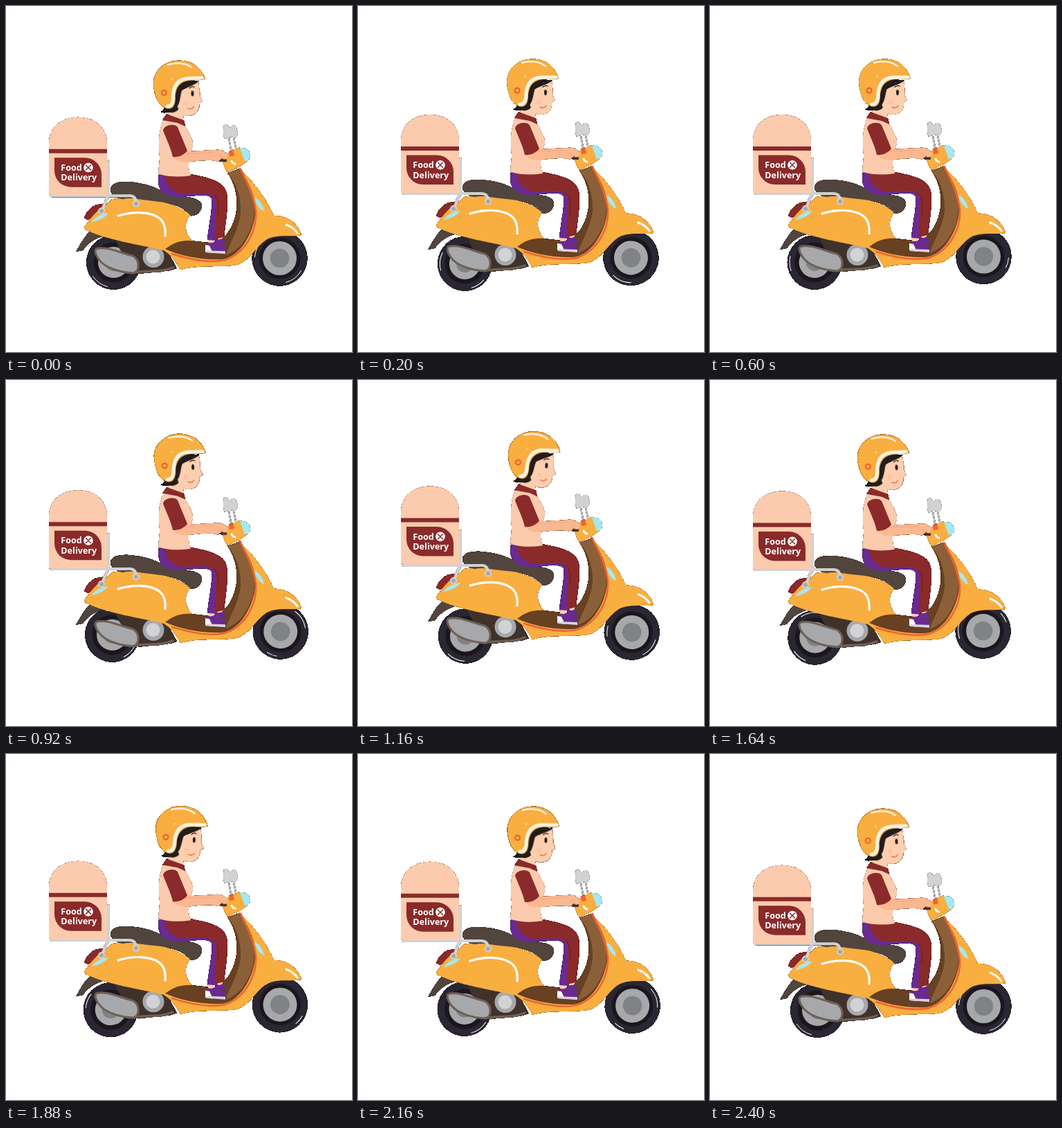
Animation of 500 by 500 pixels, one loop 2440 ms. Source, as an HTML page:

```html
<!DOCTYPE html>
<html lang="en">
<head>
<meta charset="utf-8">
<title>Food delivery scooter</title>
<style>
@property --a { syntax: "<angle>"; inherits: true; initial-value: 0deg; }
html, body { margin: 0; width: 100%; height: 100%; overflow: hidden; background: #fff; }
svg { display: block; width: 100vw; height: 100vh; animation: ride 2440ms steps(61) infinite; }
@keyframes ride { from { --a: 0deg; } to { --a: 1098deg; } }

/* --k is the height of the bounce */
.bob { transform: translateY(calc(cos(var(--a)) * var(--k) * 1px)); }
.head { transform: translateY(calc(cos(var(--a)) * 2.5px)) rotate(calc(cos(var(--a)) * -2.6deg)); transform-origin: 247px 158px; }
.wheel { transform: rotate(calc(var(--a) * 2 / 3)); }

.l { fill: none; stroke-linecap: round; stroke-linejoin: round; }
.yellow { fill: #f9ae40; }
.red { fill: #8a2b2c; }
.purple { fill: #692c91; }
.skin { fill: #fdcfae; }
.arm { fill: #fab890; }
.peach { fill: #fccbad; }
.dark { fill: #51443e; }
.engine { fill: #3f322b; }
.grey { fill: #a6a8ab; }
.hub { fill: #808285; }
.black { fill: #201a1b; }
.glass { fill: #a5e8f4; }
.tyre { fill: #2b2833; }
.well { fill: #1b191f; }
.white { stroke: #fff; }
text { font: 700 12.6px "Open Sans", "Noto Sans", sans-serif; fill: #fff; }
</style>
</head>
<body>
<svg viewBox="0 0 500 500">
  <!-- hard dark rim around the whole silhouette -->
  <filter id="rim" filterUnits="userSpaceOnUse" x="0" y="0" width="500" height="500">
    <feComponentTransfer in="SourceAlpha">
      <feFuncA type="discrete" tableValues="0 1 1 1 1"/>
    </feComponentTransfer>
    <feMerge>
      <feMergeNode/>
      <feMergeNode in="SourceGraphic"/>
    </feMerge>
  </filter>

  <g filter="url(#rim)">
  <!-- wheels turn slightly off centre -->
  <g transform="translate(153.3 370.5)">
    <g class="wheel">
      <g transform="translate(2.2 0)">
        <circle class="tyre" r="39.3"/>
        <circle class="well" r="29"/>
        <circle class="grey" r="22.5"/>
        <circle class="hub" r="12.5"/>
        <path class="l white" d="M-9 35A36 36 0 0 1-30 20M35 9A36 36 0 0 0 34-12"/>
      </g>
    </g>
  </g>
  <g transform="translate(395.5 363.3)">
    <g class="wheel">
      <g transform="translate(0 1.2)">
        <circle class="tyre" r="40"/>
        <circle class="well" r="30"/>
        <circle class="grey" r="24.5"/>
        <circle class="hub" r="13.8"/>
        <path class="l white" d="M31 18A36 36 0 0 1 9 35M-36-2A36 36 0 0 1-32-16"/>
      </g>
    </g>
  </g>

  <!-- engine and exhaust -->
  <g class="bob" style="--k:3">
    <path class="dark" d="M101 352C107 343 113 327 127 319L152 327C132 330 120 338 111 350Z"/>
    <path class="engine" d="M158 334L230 345L247 376L238 379L192 384C178 370 166 351 163 346Z"/>
    <path class="grey" stroke="#6e6056" stroke-width="3" d="M130 348C145 343 165 354 183 358C194 364 193 379 185 383C165 382 143 376 134 363C129 356 128 351 130 348Z"/>
    <path class="l" stroke="#6e6056" stroke-width="3.5" d="M186 382C203 379 222 383 241 375"/>
    <circle class="grey" cx="213" cy="359.5" r="15.5"/>
    <circle cx="212.5" cy="359.5" r="10" fill="#d1d3d4"/>
  </g>

  <!-- scooter body -->
  <g class="bob" style="--k:3.2">
    <g class="l" stroke="#bfc1c3" stroke-width="2">
      <path d="M322 187L325 204M329 187L332 202"/>
    </g>
    <path fill="#d0d2d3" d="M315 168C318 167 322 170 324 173C326 169 330 167 332 171C336 177 336 185 331 187L324 186L316 189C313 183 314 174 315 168Z"/>

    <path class="red" d="M113 303C117 291 128 282 142 283L127 302L118 306Z"/>
    <path class="yellow" d="M113 316C121 307 127 294 145 284L153 276C196 269 240 279 267 298C257 308 257 325 270 337L300 342L334 315L340 250L333 231C350 239 379 278 387 300C406 298 424 313 427 328C414 331 393 326 377 334C358 346 351 371 325 372C300 374 275 371 252 378C245 365 238 356 228 350C195 342 145 335 115 320Z"/>
    <path fill="#673f20" d="M230 348C243 338 254 335 268 336L303 340C338 320 342 268 320 238L337 232C357 258 364 285 359 305C353 335 333 362 310 363C280 364 250 357 230 348Z"/>
    <path fill="#8b6039" d="M320 238L336 233C358 260 363 290 356 312C347 338 335 350 318 357C322 341 337 320 339 295C340 273 332 250 320 238Z"/>
    <path class="l" stroke="#ee6432" stroke-width="2.6" d="M240 355C262 362 292 369 316 364C346 354 363 322 361 293C358 270 349 251 338 232"/>
    <path class="l white" stroke-width="3.2" d="M162 300C184 293 208 294 221 303C229 309 231 318 230 329"/>
    <path class="l white" stroke-width="3" d="M405 313Q416 317 421 325"/>
    <path class="glass" d="M123 309C129 302 137 297 148 296C143 303 132 308 123 309Z"/>
    <path class="glass" d="M359 273C366 276 372 285 373 293C365 290 361 282 359 273Z"/>
    <path class="dark" d="M151 264C150 252 164 249 187 252C216 255 231 270 253 272C271 273 284 277 283 286C282 295 276 300 267 300C256 286 238 281 216 279C193 277 181 273 169 276C160 275 154 271 151 264Z"/>

    <path class="yellow" d="M312 214L337 201L347 208L349 221L337 229L320 237C315 231 313 222 312 214Z"/>
    <path class="glass" d="M338 202C347 201 353 206 353 214C352 219 349 221 345 221Z"/>
    <path fill="#ee6432" d="M322 207L328 204L330 213L323 214Z"/>
    <path class="l white" stroke-width="3" d="M326 221Q328 225 331 225"/>
    <path class="l" stroke="#3f3532" stroke-width="4.5" d="M304 218L317 220"/>
  </g>

  <!-- box and rack -->
  <g class="bob" style="--k:3.2">
    <g class="l" stroke="#d0d2d3" stroke-width="4">
      <path d="M148 221V270L139 291M66 271H176Q187 270 188 280"/>
    </g>
    <g fill="#a6a8ab" stroke="#d0d2d3" stroke-width="2">
      <circle cx="138" cy="293" r="4"/>
      <circle cx="188" cy="282.5" r="4"/>
    </g>
  </g>
  <g class="bob" style="--k:3.7">
    <path class="peach" d="M62 270V195C62 171 80 157 104 157C128 157 146 171 146 195V270Z"/>
    <path class="red" d="M62 203H146V209H62Z"/>
    <path class="red" d="M70 215.5H114A24 24 0 0 1 138 239.5V258H94A24 24 0 0 1 70 234Z"/>
    <text x="79.3" y="234.3">Food</text>
    <text x="79.3" y="248.6">Delivery</text>
    <circle cx="119" cy="229.8" r="6.8" fill="#fff"/>
    <path class="l" stroke="#8a2b2c" stroke-width="1.5" d="M115.5 226.3L122.5 233.3M122.5 226.3L115.5 233.3"/>
  </g>

  <!-- shoes -->
  <g class="bob" style="--k:2.2">
    <path class="skin" d="M292 331H301V342H292ZM306 326H313V337H306Z"/>
    <path class="purple" d="M303 334C308 336 312 335 314 332L318 342L302 344ZM290 339C295 341 300 340 302 338L318 347V353L290 351Z"/>
    <path fill="#fff" d="M288 343L294 344L299 355L288 353Z"/>
    <path fill="#d8d3df" d="M289 351L317 352V356L289 354Z"/>
  </g>

  <!-- legs -->
  <g class="bob" style="--k:3">
    <path class="purple" d="M221 240C217 263 227 273 250 273C274 272 291 267 297 275C299 290 293 312 291 335L304 336L315 280L290 252L266 240Z"/>
    <path class="red" d="M229 240L267 240C293 245 315 250 319 267C322 285 317 313 315 331L302 334C301 308 306 286 302 274C293 263 270 269 253 268C239 266 230 254 229 240Z"/>
    <path class="l" stroke="#6c2023" d="M301 270Q309 279 306 300"/>
  </g>

  <!-- torso and arm -->
  <g class="bob" style="--k:3">
    <path class="skin" d="M239 140L258 148L255 166L232 160Z"/>
    <path class="peach" d="M229 160C220 173 220 198 222 214C222 228 219 236 221 240Q242 246 267 242C261 229 265 212 270 199C271 187 261 176 256 165Z"/>
    <path class="red" d="M232 153L257 162L259 171L248 166L226 162Z"/>
    <path class="arm" d="M240 211L261 204L264 207L301 205C309 203 318 207 320 212C321 219 315 220 312 217L306 222C299 219 284 220 266 222C251 224 244 220 240 211Z"/>
    <path class="l" stroke="#f4a87f" d="M257 210Q282 210 301 208M307 213L315 217"/>
    <path class="red" d="M227 177C228 169 243 166 248 172L262 206C257 213 248 216 241 215C238 201 231 188 227 177Z"/>
  </g>

  <!-- head -->
  <g class="head">
    <path class="black" d="M230 136C231 144 229 148 224 149C229 152 234 150 238 151C246 152 252 147 255 139L260 120L281 111L267 104L244 107Z"/>
    <path class="skin" d="M250 125C257 117 267 116 280 109C282 116 281 126 282 130L285 137L280 139C281 150 274 157 264 157C254 157 249 149 248 139Z"/>
    <path class="black" d="M247 114C258 107 270 109 281 107C274 114 264 115 257 117C253 125 254 133 249 142L245 138Z"/>
    <path class="yellow" d="M216 118C211 90 233 76 253 76.5C275 77 287 92 290 105L267 106C252 108 247 117 246 129C246 142 241 147 233 145C222 141 218 130 216 118Z"/>
    <path class="l" stroke="#fff3e4" stroke-width="5" d="M286 103L264 103C249 104 244 114 243 127C243 137 240 142 234 142"/>
    <path class="l white" stroke-width="2" d="M237 82C251 78 264 81 271 87"/>
    <circle cx="230" cy="122" r="3.5" fill="#f9ae40" stroke="#e85c2d" stroke-width="2"/>
    <circle cx="242" cy="102" r="1.5" fill="#fbd08e"/>
    <ellipse class="black" cx="271" cy="125" rx="2" ry="4"/>
    <path class="l" stroke="#201a1b" stroke-width="1.3" d="M267 117Q271 114 274 116"/>
    <path class="l" stroke="#df5b38" stroke-width="1.2" d="M263 146Q269 149 272 144"/>
    <circle cx="261" cy="139" r="3.5" fill="#f9ac8d" opacity=".3"/>
  </g>
  </g>
</svg>
</body>
</html>
```
